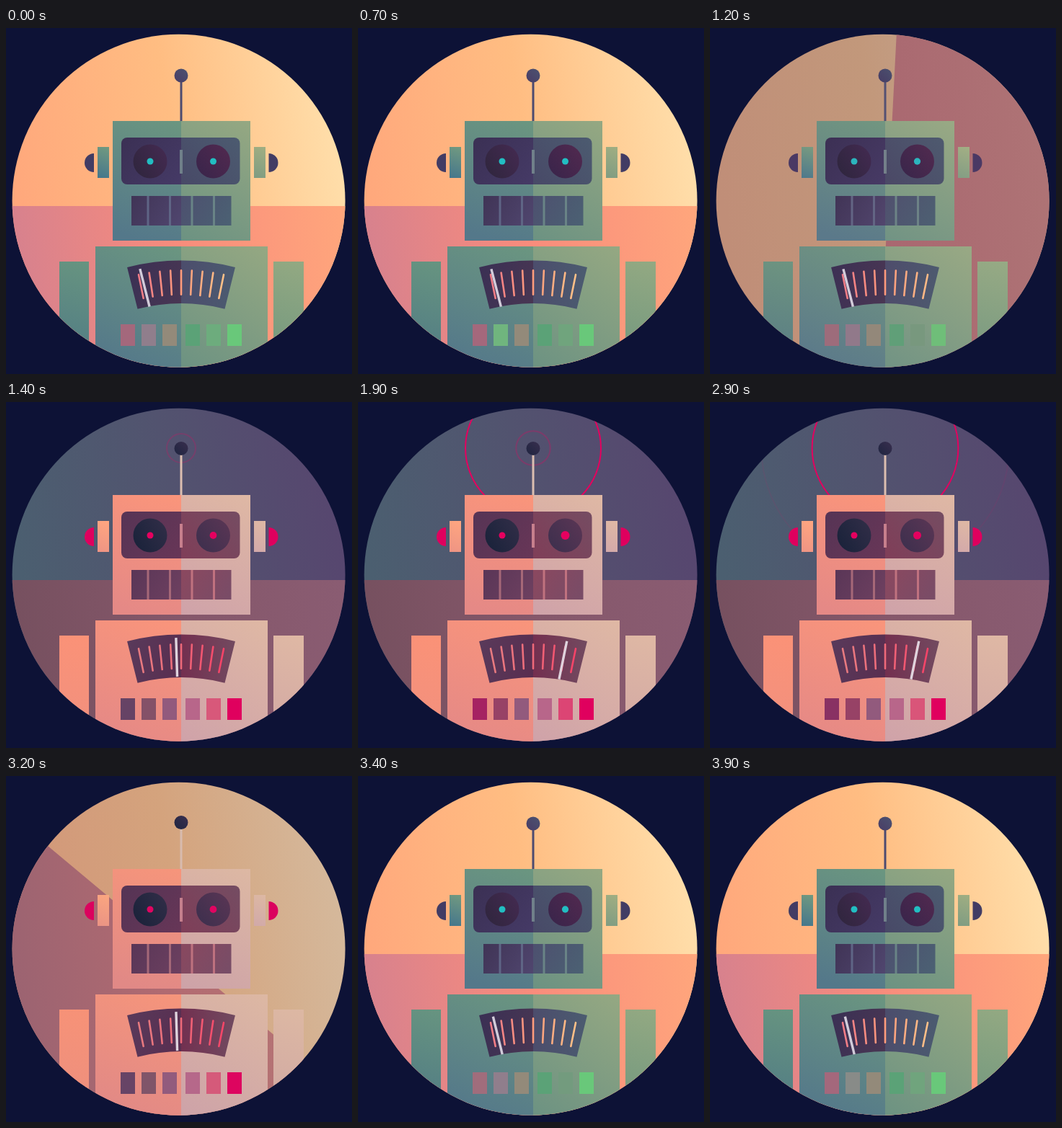
Write an HTML page with a canvas that moves like this. It is 480x480 px and loops after 4000 ms.

```html
<!DOCTYPE html>
<html lang="en">
<head>
<meta charset="utf-8">
<title>Robot mood swing</title>
<style>
html, body { margin: 0; width: 100%; height: 100%; overflow: hidden; background: #0d1236; }
canvas { display: block; width: 480px; height: 480px; }
</style>
</head>
<body>
<canvas id="stage" width="480" height="480"></canvas>
<script>
const ctx = document.getElementById('stage').getContext('2d');
const LOOP = 4000, STEP = 100, MID = 243, TAU = Math.PI * 2;

const rad = deg => deg * Math.PI / 180;
const clamp = v => Math.max(0, Math.min(1, v));
const lerp = (a, b, k) => a + (b - a) * k;
const smooth = k => k * k * (3 - 2 * k);
const rgb = hex => [1, 3, 5].map(i => parseInt(hex.slice(i, i + 2), 16));

function mix(a, b, k) {
  const q = rgb(b);
  return `rgb(${rgb(a).map((v, i) => Math.round(lerp(v, q[i], k)))})`;
}

// 0 by day, 1 by night, switching over span ms at the on and off times.
const shift = (t, on, off, span, ease = k => k) =>
  ease(clamp((t - on) / span)) - ease(clamp((t - off) / span));

// Soft blink, rate times per loop, brightest at peak.
const blink = (t, peak, rate) =>
  rate ? Math.pow(.5 + .5 * Math.cos(TAU * rate * (t - peak) / LOOP), 3) : 0;

// Blend of day and night for the robot.
let mood = 0;
const tone = (day, night) => mix(day, night, mood);

function ramp(x0, y0, x1, y1, day, night, k = mood) {
  const g = ctx.createLinearGradient(x0, y0, x1, y1);
  day.forEach((c, i) => g.addColorStop(i / (day.length - 1), mix(c, night[i], k)));
  return g;
}

function box(x, y, w, h, fill) {
  ctx.fillStyle = fill;
  ctx.fillRect(x, y, w, h);
}

function disc(x, y, r, fill, from = 0, to = TAU) {
  ctx.beginPath();
  ctx.arc(x, y, r, from, to);
  ctx.fillStyle = fill;
  ctx.fill();
}

// Fills one path with different paint either side of the middle line.
function split(path, left, right) {
  [[0, left], [MID, right]].forEach(([x, fill]) => {
    ctx.save();
    ctx.beginPath();
    ctx.rect(x, 0, x ? 480 - MID : MID, 480);
    ctx.clip();
    ctx.beginPath();
    path();
    ctx.fillStyle = fill;
    ctx.fill();
    ctx.restore();
  });
}

// The horizon turns; the light across it stays put.
function backdrop(t) {
  const dusk = shift(t, 1130, 3050, 200);
  const turn = TAU * shift(t, 1100, 3060, 300, k => 1 - Math.pow(1 - k, 3.5));
  box(0, 0, 480, 480, ramp(9, 200, 460, 120,
    ['#ffa87c', '#ffbd82', '#ffdfab'], ['#4b5f70', '#52536f', '#57466f'], dusk));
  ctx.save();
  ctx.translate(240, 240);
  ctx.rotate(turn);
  ctx.beginPath();
  ctx.rect(-300, 7, 600, 300);
  ctx.restore();
  ctx.fillStyle = ramp(9, 330, 471, 270,
    ['#d6818e', '#f98c7c', '#ffa67c'], ['#76505f', '#85576a', '#8a5c72'], Math.pow(dusk, .35));
  ctx.fill();
}

function rings(t) {
  const life = 180, speed = .148;
  ctx.lineWidth = 2;
  ctx.strokeStyle = '#e6005f';
  for (let i = 0; i < 3; i++) {
    const r = (t - 1265 - 475 * i) * speed;
    if (r <= 0 || r >= life) continue;
    ctx.globalAlpha = clamp((3200 - t) / 100) * Math.pow(Math.sin(Math.PI * r / life), 1.4);
    ctx.beginPath();
    ctx.arc(MID, 64, r, 0, TAU);
    ctx.stroke();
  }
  ctx.globalAlpha = 1;
}

function plate(x, y, w, h) {
  split(() => ctx.rect(x, y, w, h),
    ramp(MID, y, x + 40, y + h, ['#6b9680', '#54788a'], ['#fa957b', '#e58986']),
    ramp(x + w, y, MID, y + h, ['#95a882', '#6c9282'], ['#dfb8a4', '#cfa2a9']));
}

function limbs() {
  box(74, 324, 41, 150, ramp(115, 324, 74, 470, ['#679480', '#4f7985'], ['#fb9277', '#f0907f']));
  box(371, 324, 42, 150, ramp(413, 324, 371, 470, ['#93a982', '#71977f'], ['#dfb8a4', '#d2a8a4']));
  box(127, 165, 16, 43, ramp(143, 165, 127, 208, ['#729a80', '#44768c'], ['#ffa680', '#ee9484']));
  box(344, 165, 16, 43, ramp(360, 165, 344, 208, ['#a0ae82', '#7f9c82'], ['#dfb8a4', '#d3a9aa']));
  const cap = tone('#423c64', '#df005e');
  disc(122, 187, 13, cap, Math.PI / 2, Math.PI * 1.5);
  disc(364.5, 187, 13, cap, -Math.PI / 2, Math.PI / 2);
}

function antenna() {
  box(MID - 1.5, 70, 3, 59, tone('#4d4b70', '#dcbeb0'));
  const y = 66 - 1.6 * mood;
  disc(MID, y, 9.5, ramp(252, y - 9, 234, y + 9, ['#4c5270', '#493d66'], ['#382e4e', '#1f2540']));
}

function head(t) {
  plate(148, 129, 191, 166);
  split(() => ctx.roundRect(160, 152, 164.5, 65, 8),
    ramp(160, 152, MID, 217, ['#3b3054', '#453a66'], ['#563455', '#683657']),
    ramp(325, 152, MID, 217, ['#4c5b70', '#484967'], ['#754c62', '#803e58']));
  disc(200, 185, 23.5, ramp(180, 198, 223, 172, ['#31263f', '#432a50'], ['#1b233b', '#302d47']));
  disc(287.5, 185, 23.5, ramp(270, 200, 310, 170, ['#3c254b', '#50294f'], ['#40304e', '#583554']));
  const pupil = tone('#22bec2', '#e6005f');
  disc(200, 185, 4.5, pupil);
  disc(287.5, 185, 4.5 + 2 * blink(t, 2300, 1), pupil);
  box(MID - 2, 169, 4, 33, tone('#70808a', '#c77f8d'));

  split(() => ctx.rect(174, 233, 138.5, 41),
    ramp(174, 233, MID, 274, ['#403456', '#50466f'], ['#5a3657', '#6e4060']),
    ramp(MID, 233, 313, 274, ['#4d506f', '#4b6173'], ['#8b485f', '#784c67']));
  for (let x = 197; x < 300; x += 30.5)
    box(x - 1.5, 233, 3, 41, x < MID ? tone('#5f6585', '#a66878') : tone('#698486', '#c0727f'));
}

function gauge(t) {
  const cy = 631.7, half = Math.atan(.25);
  split(() => {
    ctx.arc(MID, cy, 309, -Math.PI / 2 - half, -Math.PI / 2 + half);
    ctx.arc(MID, cy, 249.5, -Math.PI / 2 + half, -Math.PI / 2 - half, true);
    ctx.closePath();
  }, ramp(168, 350, MID, 370, ['#3b3054', '#483653'], ['#59395a', '#592e50']),
     ramp(MID, 350, 318, 350, ['#4c4d6c', '#4b5b70'], ['#732f4f', '#724a60']));

  ctx.lineWidth = 2.6;
  ctx.lineCap = 'round';
  ctx.strokeStyle = ramp(184, 0, 302, 0, ['#f27b87', '#ff9c7b', '#ffc188'], ['#e77b80', '#ee6979', '#f64267']);
  ctx.beginPath();
  for (let i = -4; i <= 4; i++) {
    const a = rad(i * 2.88);
    ctx.moveTo(MID + 295.5 * Math.sin(a), cy - 295.5 * Math.cos(a));
    ctx.lineTo(MID + 262 * Math.sin(a), cy - 262 * Math.cos(a));
  }
  ctx.stroke();

  const swing = lerp(-14.2, 11.2, shift(t, 1255, 3050, 300, smooth));
  ctx.save();
  ctx.translate(MID, 560);
  ctx.rotate(rad(swing - .4 * Math.sin(TAU * t / 500)));
  box(-1.7, -233, 3.4, 54, tone('#d2ccda', '#dfd3dd'));
  ctx.restore();
}

const LIGHTS = [
  { day: '#a4687c', night: '#4f4e66', peak: 2300, rate: 1 },
  { day: '#927b8c', night: '#805468', peak: 700, rate: 4 },
  { day: '#938a7a', night: '#925a7d' },
  { day: '#5ba277', night: '#b8668a' },
  { day: '#739b7e', night: '#d8587a', peak: 300, rate: 2 },
  { day: '#69c87a', night: '#e0005e' }
];

function lights(t) {
  LIGHTS.forEach(({ day, night, peak, rate }, i) => {
    const x = 159 + 29 * i + (i > 2 ? 3 : 0);
    box(x, 411, 20, 30, tone(day, night));
    ctx.globalAlpha = .75 * blink(t, peak, rate);
    box(x, 411, 20, 30, tone('#64c87a', '#ea005f'));
    ctx.globalAlpha = 1;
  });
}

function draw(t) {
  mood = shift(t, 1190, 3195, 200);
  box(0, 0, 480, 480, '#0d1236');
  ctx.save();
  ctx.beginPath();
  ctx.arc(239.6, 239.8, 231, 0, TAU);
  ctx.clip();
  backdrop(t);
  rings(t);
  limbs();
  antenna();
  head(t);
  plate(124, 303, 239, 170);
  gauge(t);
  lights(t);
  ctx.restore();
}

const begin = performance.now();
function tick() {
  const t = (performance.now() - begin) % LOOP;
  draw(Math.floor(t / STEP) * STEP);
  requestAnimationFrame(tick);
}
tick();
</script>
</body>
</html>
```
